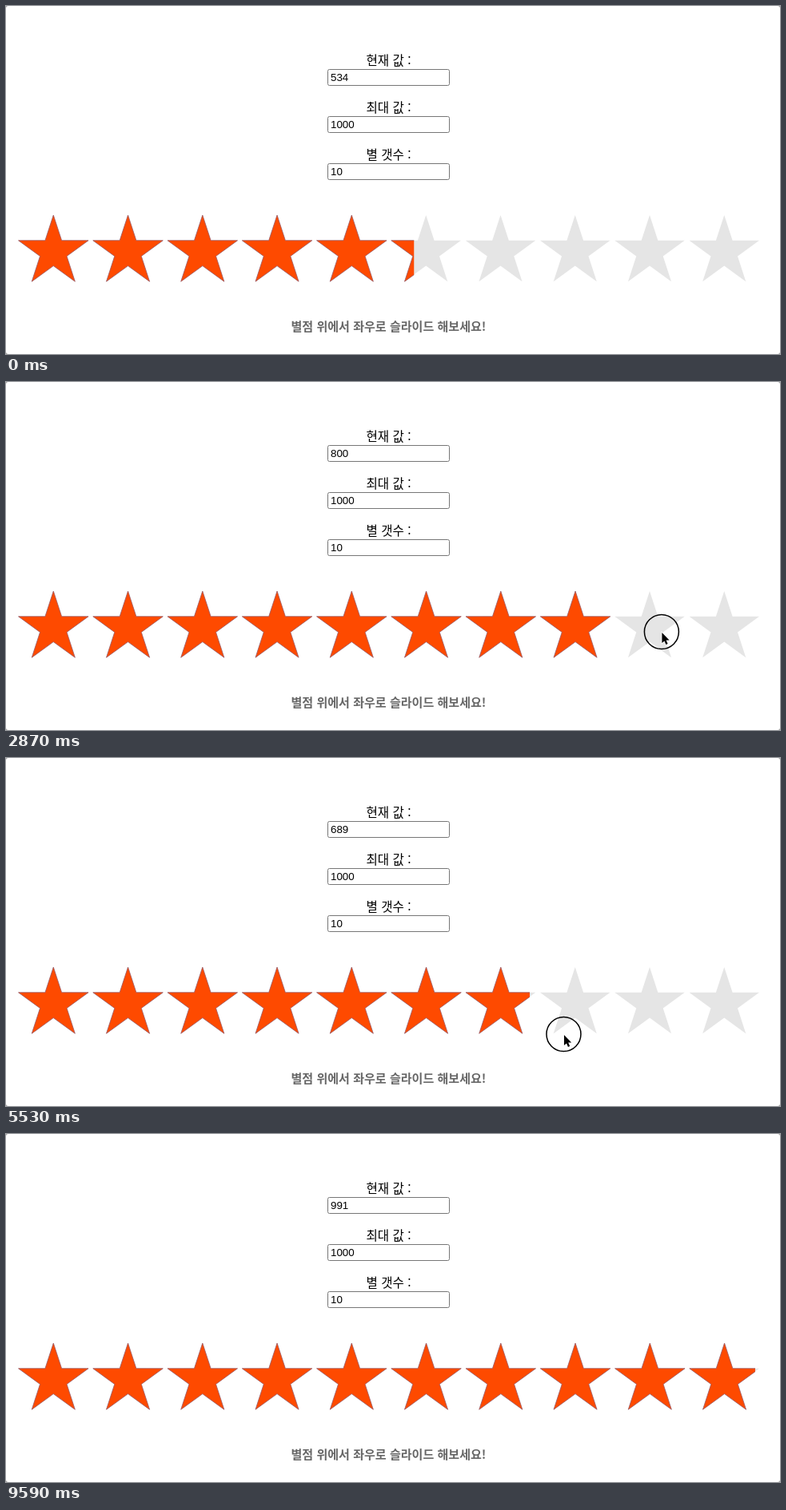
Write an HTML page that moves like this. It is 968 px wide and 436 px high and loops after 9.66 s.

```html
<!DOCTYPE html>
<html lang="ko">
<head>
<meta charset="utf-8">
<style>
  html, body { margin: 0; width: 100%; height: 100%; overflow: hidden; background: #999; }
  svg { display: block; width: 968px; height: 436px; }
  text { font: 15.6px "Noto Sans CJK KR", "Noto Sans CJK", sans-serif; text-anchor: middle; }
  .value { font: 13.33px "Liberation Sans", Arial, sans-serif; text-anchor: start; }
  .hint { font-size: 15.05px; font-weight: 700; fill: #666; }
  .field { fill: #fff; stroke: #767676; }
</style>
</head>
<body>
<svg viewBox="0 0 968 436">
  <defs>
    <polygon id="star"/>
    <g id="row"></g>
    <clipPath id="clip"><rect id="fill" y="250" height="110"/></clipPath>
  </defs>
  <rect width="968" height="436" rx="3" fill="#fff"/>
  <g id="form"></g>
  <use href="#row" fill="#e5e5e5"/>
  <g clip-path="url(#clip)">
    <use href="#row" x=".3" fill="#fe4a00" stroke="#985a66" stroke-width=".8"/>
  </g>
  <text class="hint" x="478.5" y="407">별점 위에서 좌우로 슬라이드 해보세요!</text>
  <g id="cursor">
    <circle cx="-.5" r="21.5" fill="none" stroke="#000" stroke-width="1.5"/>
    <path d="M0 1V14L3 11.5L5 16L7.2 15L5.2 10.6H9.2Z" stroke="#fff" paint-order="stroke" stroke-width="1.6"/>
  </g>
</svg>
<script>
const $ = id => document.getElementById(id);
const repeat = (n, make) => Array.from({ length: n }, (_, i) => make(i));
const LOOP = 9660, STEP = 70, LAG = 140;
const LEFT = 11.5, UNIT = 0.934, MAX = 991;

// where the pointer turns: time, x, y
const turns = [
  [70, 510, 402], [500, 490, 313], [1500, 300.7, 313], [3400, 934.5, 313],
  [3893, 337.5, 315], [4450, 800, 330], [5050, 597, 346], [5900, 765, 346],
  [6250, 590.5, 343], [6950, 780.5, 338], [7680, 583.5, 298], [8820, 1000, 300]
];
const START = turns[0][0], END = turns.at(-1)[0];

// sine ease from one turn to the next
function pointer(time) {
  const t = Math.max(START, Math.min(END, time));
  const i = Math.max(1, turns.findIndex(p => p[0] >= t));
  const [t0, x0, y0] = turns[i - 1], [t1, x1, y1] = turns[i];
  const k = (1 - Math.cos(Math.PI * (t - t0) / (t1 - t0))) / 2;
  return [x0 + (x1 - x0) * k, y0 + (y1 - y0) * k];
}

$("star").setAttribute("points", repeat(10, i => {
  const r = i % 2 ? 17.6 : 46, a = i * Math.PI / 5;
  return [59 + r * Math.sin(a), 308 - r * Math.cos(a)].map(n => n.toFixed(2));
}).join(" "));
$("row").innerHTML = repeat(10, i => `<use href="#star" x="${i * 93.25}"/>`).join("");
$("form").innerHTML = [["현재 값 :", 534], ["최대 값 :", 1000], ["별 갯수 :", 10]]
  .map(([label, value], i) => `<g transform="translate(0 ${i * 59})">
    <text x="478.5" y="73.5">${label}</text>
    <rect class="field" x="402.5" y="79.5" width="152" height="20" rx="2"/>
    <text class="value" x="406" y="94">${value}</text></g>`).join("");
const current = document.querySelector(".value");

function draw(now) {
  const t = Math.floor(now % LOOP / STEP) * STEP;
  // the rating trails the pointer
  const value = Math.min(MAX, Math.round((pointer(t - LAG)[0] - LEFT) / UNIT));
  current.textContent = value;
  $("fill").setAttribute("width", LEFT + value * UNIT);
  $("cursor").setAttribute("transform", `translate(${pointer(t)})`);
  $("cursor").style.display = t < START || t > END ? "none" : "";
  requestAnimationFrame(draw);
}
draw(0);
</script>
</body>
</html>
```
